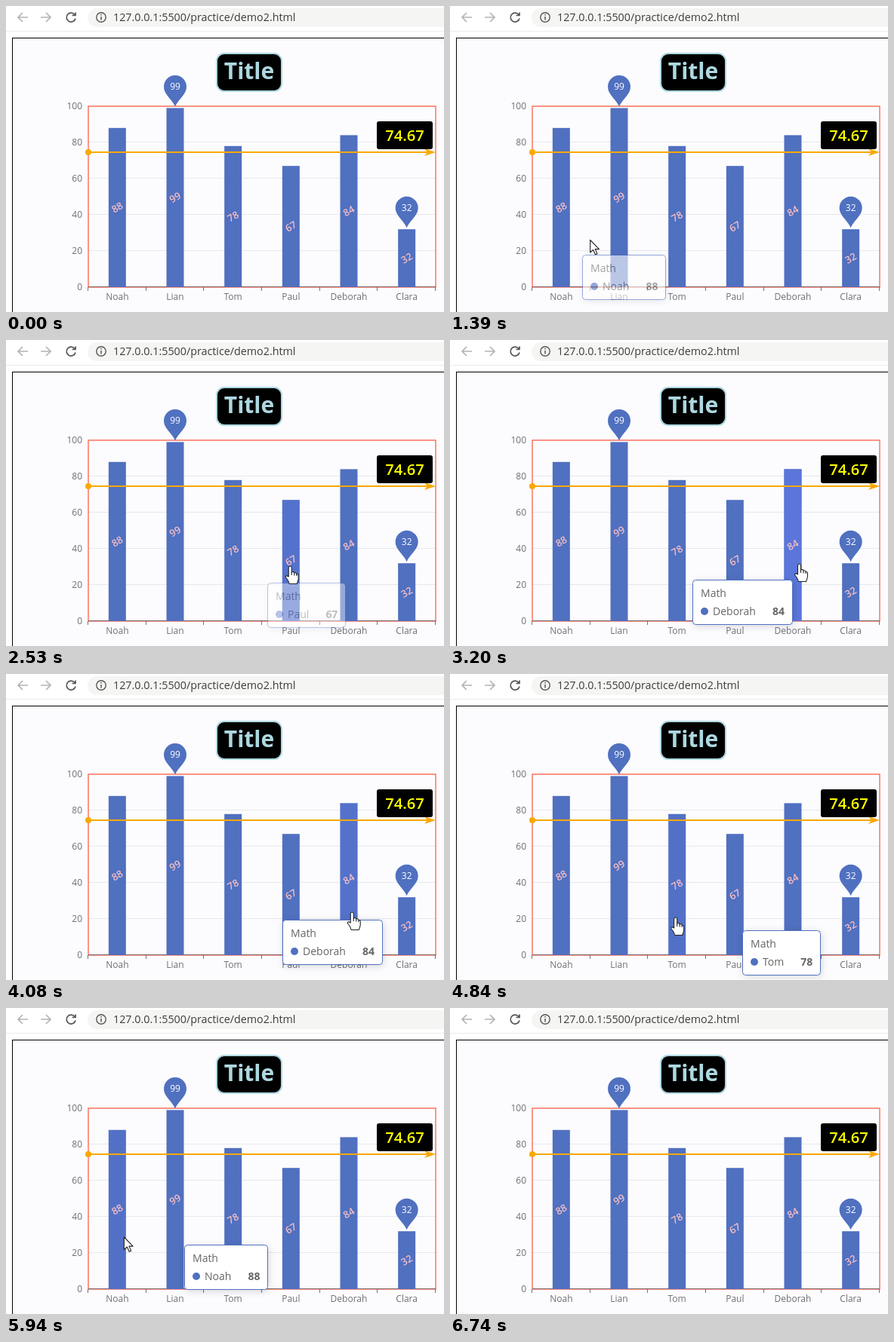
Write an HTML page that moves like this. It is 580x406 px and loops after 6.79 s.

```html
<!DOCTYPE html>
<html>
<head>
<meta charset="utf-8">
<style>
  html, body { margin: 0; width: 100%; height: 100%; overflow: hidden; background: #fff; }
  svg { display: block; font-family: "Open Sans", "Noto Sans", sans-serif; }
  .axis { font-size: 12px; fill: #6e7074; }
  .mid { text-anchor: middle; }
  #tip text { font-size: 14px; fill: #666; }
  #tip .bold { font-weight: 700; text-anchor: end; }
  #box { filter: drop-shadow(1px 2px 5px rgba(0, 0, 0, .14)); }
</style>
</head>
<body>
<svg id="stage" width="580" height="406" viewBox="0 0 580 406"></svg>
<script>
const LOOP = 6790, START = 124, STEP = 42, LAST = 157;
const BLUE = '#5070c0', RED = '#ff7462', GOLD = '#f9a800', SKY = '#add8e0';
const data = [['Noah', 88], ['Lian', 99], ['Tom', 78], ['Paul', 67], ['Deborah', 84], ['Clara', 32]];
const LEFT = 109, BASE = 373, SLOT = 460 / 6, TURN = data.length - 1;
const barX = i => LEFT + SLOT * (i + .5);
const valueY = v => BASE - v * 2.4;
const clamp = v => Math.max(0, Math.min(1, v));
const lerp = (a, b, u) => a.map((v, i) => v + (b[i] - v) * u);
const $ = id => document.getElementById(id);

// The pointer walks over the bars to the right and back: arrival step, offset in the bar, height.
const OFF = [30, 430];
const stops = [
  [20, -9, 310], [34, -9, 311], [44, -9, 303], [56, -9, 300], [68, -9, 297], [82, -9, 302],
  [93, 9, 316], [102, 9, 320], [112, -2, 323], [121, 9, 294], [138, 9, 304]
].map(([f, dx, y], k) => {
  const x = barX(TURN - Math.abs(TURN - k)), side = k < TURN ? 9 : -9;
  return { f, from: [x + dx, y], to: [x + side, y] };
});

// In a bar the pointer drifts to the far side; it crosses slowly on the way out, fast on the way back.
function pointer(f) {
  const k = stops.filter(s => s.f <= f).length - 1;
  if (k < 0) return lerp(OFF, stops[0].from, clamp((f - 12) / 8));
  const stop = stops[k], next = stops[k + 1] || { f: 153, from: OFF };
  const cross = k < TURN || !stops[k + 1] ? 8 : 2;
  const leave = next.f - cross;
  if (f >= leave) return lerp(stop.to, next.from, clamp((f - leave) / cross));
  const rest = 1 - (f - stop.f) / (leave - stop.f);
  return lerp(stop.to, stop.from, rest * rest);
}

function barAt(x, y) {
  return data.findIndex(([, v], i) => Math.abs(x - barX(i)) <= 12 && y > valueY(v) && y < BASE);
}

function text(x, y, s, attrs = '') {
  return `<text x="${x}" y="${y}" ${attrs}>${s}</text>`;
}

function pin(i) {
  const v = data[i][1];
  return `<g transform="translate(${barX(i)} ${valueY(v)})">
    <path fill="${BLUE}" d="M0-2C-3-10-14-18-14.8-26A15 15 0 1 1 14.8-26C14-18 3-10 0-2Z"/>
    ${text(0, -24, v, 'class="mid" font-size="12" fill="#fff"')}</g>`;
}

function toolbar() {
  return `<rect x="108" y="3" width="500" height="25" rx="12.5" fill="#f5f6f3"/>
    <path d="M0 33.5H580" stroke="#ececec"/>
    <g fill="none" stroke-width="1.7">
      <path d="M29 15H16M22 9L16 15L22 21M46 15H59M53 9L59 15L53 21" stroke="#b4b4b8"/>
      <path d="M91 11.5A6 6 0 1 0 92 16.5M92 8.5V12.5H87.5" stroke="#555"/>
      <circle cx="126" cy="15" r="6.2" stroke="#555" stroke-width="1.4"/>
      <path d="M126 14V18.5M126 11V12.6" stroke="#555" stroke-width="1.5"/>
    </g>
    ${text(142, 20, '127.0.0.1:5500/practice/demo2.html', 'font-size="14.3" fill="#3c3c3c"')}`;
}

function chart() {
  let s = '<rect x="8.5" y="42.5" width="620" height="400" fill="#fcfcfe" stroke="#000"/>';
  for (let v = 0; v <= 100; v += 20) {
    const y = valueY(v);
    s += `<path d="M109 ${y - .5}H569" stroke="#e6e8ec"/>` + text(101, y + 3.5, v, 'class="axis" text-anchor="end"');
  }
  s += `<rect x="109" y="133" width="460" height="240" fill="none" stroke="${RED}" stroke-width="1.5"/>
    <path d="M109 372.5H569" stroke="#7a6c70"/>`;
  for (let i = 0; i <= data.length; i++) {
    s += `<path d="M${Math.round(LEFT + SLOT * i) - .5} 373v5" stroke="#7a7074"/>`;
  }
  data.forEach(([name, v], i) => {
    const x = barX(i), y = valueY(v);
    const rect = `x="${x - 11.5}" y="${y}" width="23" height="${BASE - y}"`;
    s += `<rect ${rect} fill="${BLUE}"/><rect id="glow${i}" ${rect} fill="#5a76da" opacity="0"/>`
      + text(x, 390, name, `id="name${i}" class="axis mid"`)
      + text(0, 4.5, v, `class="mid" font-size="13" font-weight="600" fill="#f6bec4"
        transform="translate(${x} ${(y + BASE) / 2}) rotate(-30)"`);
  });
  return s + pin(1) + pin(5)
    + `<path d="M109 194H562" stroke="${GOLD}" stroke-width="2"/>
    <circle cx="109" cy="194" r="4" fill="${GOLD}"/>
    <path d="M569 194l-15-5l4 5l-4 5Z" fill="${GOLD}"/>
    <rect x="491" y="153" width="74" height="37" rx="3"/>
    ${text(528, 179, '74.67', 'class="mid" font-size="20.2" font-weight="600" fill="#ff0"')}
    <rect x="279" y="63" width="86" height="50" rx="10" stroke="${SKY}" stroke-width="2"/>
    ${text(322, 96.5, 'Title', `class="mid" font-size="30" font-weight="700" fill="${SKY}"`)}`;
}

$('stage').innerHTML = toolbar() + chart() + `
  <g id="tip">
    <rect id="box" x=".5" y=".5" height="59" rx="4" fill="#fff" stroke="${BLUE}"/>
    ${text(11, 23, 'Math')}
    <circle cx="16" cy="42" r="5" fill="${BLUE}"/>
    ${text(27, 47, '', 'id="who"')}
    ${text(0, 47, '', 'id="score" class="bold"')}
  </g>
  <g id="cursor" fill="#fff" stroke="#222" stroke-width="1.1" stroke-linejoin="round">
    <path id="arrow" d="M0 0V16.5L4 13L6.8 19.3L9.3 18.2L6.6 12.1H11.8Z"/>
    <g id="hand">
      <path d="M-2 1.5Q0-1.5 2 1.5V8Q4.5 6.5 5.5 9Q8 8 8.5 10.5Q11 10 11 13V17Q10.5 20 9 23.5H-1Q-2 19-6 14.5Q-6 11.5-2 14Z"/>
      <path fill="none" d="M2 8V12M5.5 9V12.5M8.5 10.5V13"/>
    </g>
  </g>`;

const widths = data.map((d, i) => 76 + $('name' + i).getComputedTextLength() * 14 / 12);

// Replays hover, tooltip lag and fades up to the given step.
function stateAt(frame) {
  const s = { item: -1, over: -1, pos: [0, 0], alpha: 0, idle: 0, glow: data.map(() => 0), at: OFF, hand: false };
  let goal = s.pos;
  for (let f = 0; f <= frame; f++) {
    const [px, py] = s.at = pointer(f);
    const hit = barAt(px, py);
    s.hand = hit >= 0 && (hit === s.over || Math.abs(px - barX(hit)) < 6);
    s.over = hit;
    s.pos = lerp(s.pos, goal, .3);
    if (hit >= 0) {
      const w = widths[hit];
      goal = [px + 20 + w > 575 ? px - 20 - w : px + 20, py + 20];
      if (s.item < 0) s.pos = goal;
      s.item = hit;
      s.idle = 0;
    } else s.idle++;
    s.alpha = s.item < 0 ? 0 : clamp(s.alpha + (s.idle <= 2 ? .2 : -.2));
    s.glow = s.glow.map((g, i) => i === hit ? clamp(g + .2) : 0);
  }
  return s;
}

function draw(frame) {
  const s = stateAt(frame);
  s.glow.forEach((g, i) => $('glow' + i).setAttribute('opacity', g));
  $('cursor').setAttribute('transform', `translate(${s.at})`);
  $('arrow').style.display = s.hand ? 'none' : '';
  $('hand').style.display = s.hand ? '' : 'none';
  $('tip').style.opacity = s.alpha;
  if (s.item < 0) return;
  const w = widths[s.item];
  $('tip').setAttribute('transform', `translate(${s.pos.map(Math.round)})`);
  $('box').setAttribute('width', Math.round(w) - 1);
  $('who').textContent = data[s.item][0];
  $('score').textContent = data[s.item][1];
  $('score').setAttribute('x', w - 11);
}

function tick() {
  const t = performance.now() % LOOP;
  draw(Math.min(LAST, Math.floor((t - START) / STEP)));
  requestAnimationFrame(tick);
}
tick();
</script>
</body>
</html>
```
